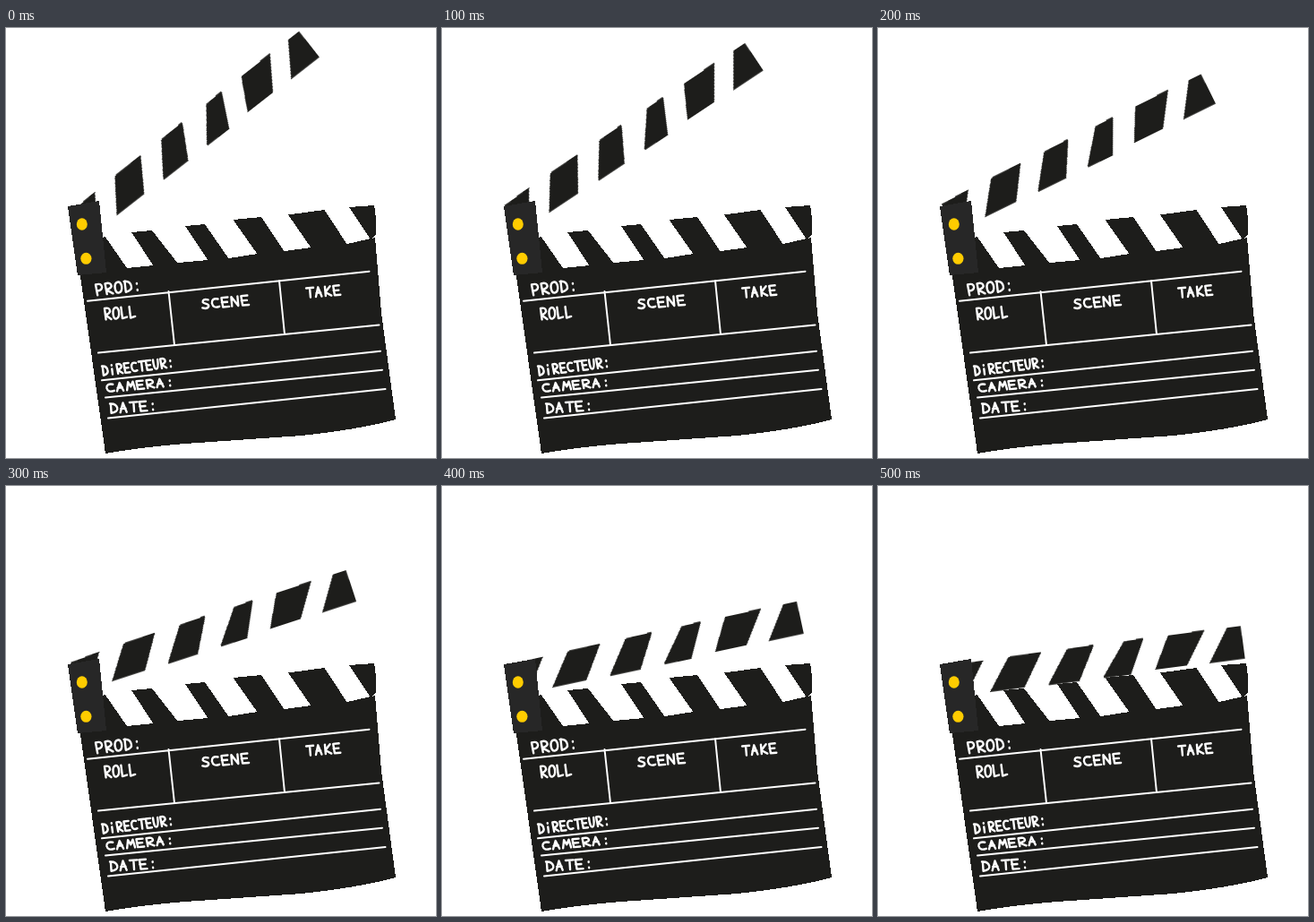
An HTML page for the animation above (0.6 s loop, 480 by 480 pixels).

```html
<!DOCTYPE html>
<html lang="fr">
<head>
<meta charset="utf-8">
<title>Clapperboard</title>
<style>
  html, body { margin: 0; width: 100%; height: 100%; overflow: hidden; background: #fff; }
  svg { display: block; width: 100%; height: 100%; }
  .ink { fill: #1d1d1b; shape-rendering: crispEdges; }
  #arm { stroke: #1d1d1b; stroke-width: .8; }
  .rules, .words { fill: none; stroke: #fff; stroke-linecap: round; stroke-linejoin: round; }
  .rules { stroke-width: 2; }
  .words path { stroke-width: 2.4; vector-effect: non-scaling-stroke; }
</style>
</head>
<body>
<svg viewBox="0 0 480 480">
  <g class="ink">
    <path d="M82 270L110 232L135 268L165 265L192 262L226 259L249 257L281 252L311 249L341 245L381 241L412 234
             L419 318L435 437Q395 448 330 455L200 464Q150 468 111 475Z"/>
    <path d="M140 228L163 226L192 263L165 266Z"/>
    <path d="M200 221L222 219L249 258L226 260Z"/>
    <path d="M253.5 214L285 211L311 250L281 253Z"/>
    <path d="M315 208.5L355.5 203L381 242L341 246Z"/>
    <path d="M383 200L411 198Q414 214 413 231L407 236Z"/>
  </g>
  <g id="arm" class="ink">
    <path d="M-38 -33L-4.5 -35L-28 0H-38Z"/>
    <path d="M-.5 .5L24.5 -35L61 -35.8L38 0Z"/>
    <path d="M65 1L90.5 -35.3L120.3 -36.2L99.6 1Z"/>
    <path d="M126.7 1L154.3 -35.3L176.3 -36.4L157.2 2Z"/>
    <path d="M185.5 -.5L204.2 -35.6L244.5 -36.2L220.4 0Z"/>
    <path d="M246.5 .5L271 -36L285.3 -35.6L286 0Z"/>
  </g>
  <path fill="#272727" shape-rendering="crispEdges" d="M69 199L104 193L107.5 228L112 273L80 276Z"/>
  <g fill="#fc0">
    <ellipse cx="84.8" cy="219" rx="6" ry="6.8"/>
    <ellipse cx="89.4" cy="257.3" rx="6.1" ry="6.5"/>
  </g>
  <path class="rules" d="M91 304.7L405.5 271.7M181.5 294L188 354M305 282L311 342M103 362.6L416.5 331.5
                         M107 393.3L418 360.7M111 412.5L420 381.7M114 435.5L423.5 403"/>
  <g id="words" class="words"></g>
</svg>
<script>
  // Hand-lettered strokes, each in a 10 by 10 box
  const glyphs = {
    P: 'M1 10L0 0Q8 -1 8 3Q7 6 1 6',
    R: 'M1 10L0 0Q8 -1 8 3Q7 5 1 6L9 10',
    O: 'M4 0C-2 1 -1 10 4 10C11 9 10 -1 4 0',
    D: 'M1 0V10Q10 9 9 5Q8 0 0 0',
    L: 'M0 0L1 10L8 9',
    S: 'M8 1Q1 -1 1 3C2 5 9 5 8 8Q6 11 0 9',
    C: 'M8 1Q0 -1 0 5Q1 11 9 9',
    E: 'M8 0H0L1 10H9M0 5H7',
    N: 'M0 10V0L8 10V0',
    T: 'M0 0H10M5 0V10',
    A: 'M0 10L4 0L8 10M1 6H7',
    K: 'M1 0V10M8 0L1 6L9 10',
    I: 'M4 4V10M4 0V.5',
    U: 'M0 0Q0 10 4 10Q8 10 8 0',
    M: 'M0 10L2 0L5 6L8 0L10 10',
    ':': 'M4 3V3.6M4 9V9.6'
  };

  // text, x, y, tilt, letter step, height
  const labels = [
    ['PROD:', 100, 286.5, -6.5, 10.6, 12],
    ['ROLL', 110, 313, -4, 9.2, 12.5],
    ['SCENE', 218.5, 303, -5, 11, 10.5],
    ['TAKE', 335, 290.5, -5, 10.1, 10.5],
    ['DIRECTEUR:', 107, 377.5, -7, 8.2, 10.5],
    ['CAMERA:', 112, 397.5, -5.5, 11.2, 9],
    ['DATE:', 116, 419.5, -4, 11, 10.5]
  ];

  document.getElementById('words').innerHTML = labels.map(([text, x, y, tilt, step, h]) => {
    const letters = [...text].map((c, i) =>
      `<path d="${glyphs[c]}" transform="translate(${i * step}) scale(${step * .08} ${h / 10})"/>`);
    return `<g role="img" aria-label="${text}" transform="translate(${x} ${y}) rotate(${tilt})">${letters.join('')}</g>`;
  }).join('');

  // Arm poses: x, y, rotation
  const poses = [
    [124, 208, -38],
    [120, 205, -33.6],
    [120, 210, -26.2],
    [119, 217, -18.1],
    [124, 224, -12.1],
    [126, 229, -7.45]
  ];
  const frames = [...poses, poses[5]].map(([x, y, a], i) => ({
    transform: `translate(${x}px, ${y}px) rotate(${a}deg)`,
    offset: i / 6,
    easing: 'step-end'
  }));
  document.getElementById('arm').animate(frames, { duration: 600, iterations: Infinity });
</script>
</body>
</html>
```
